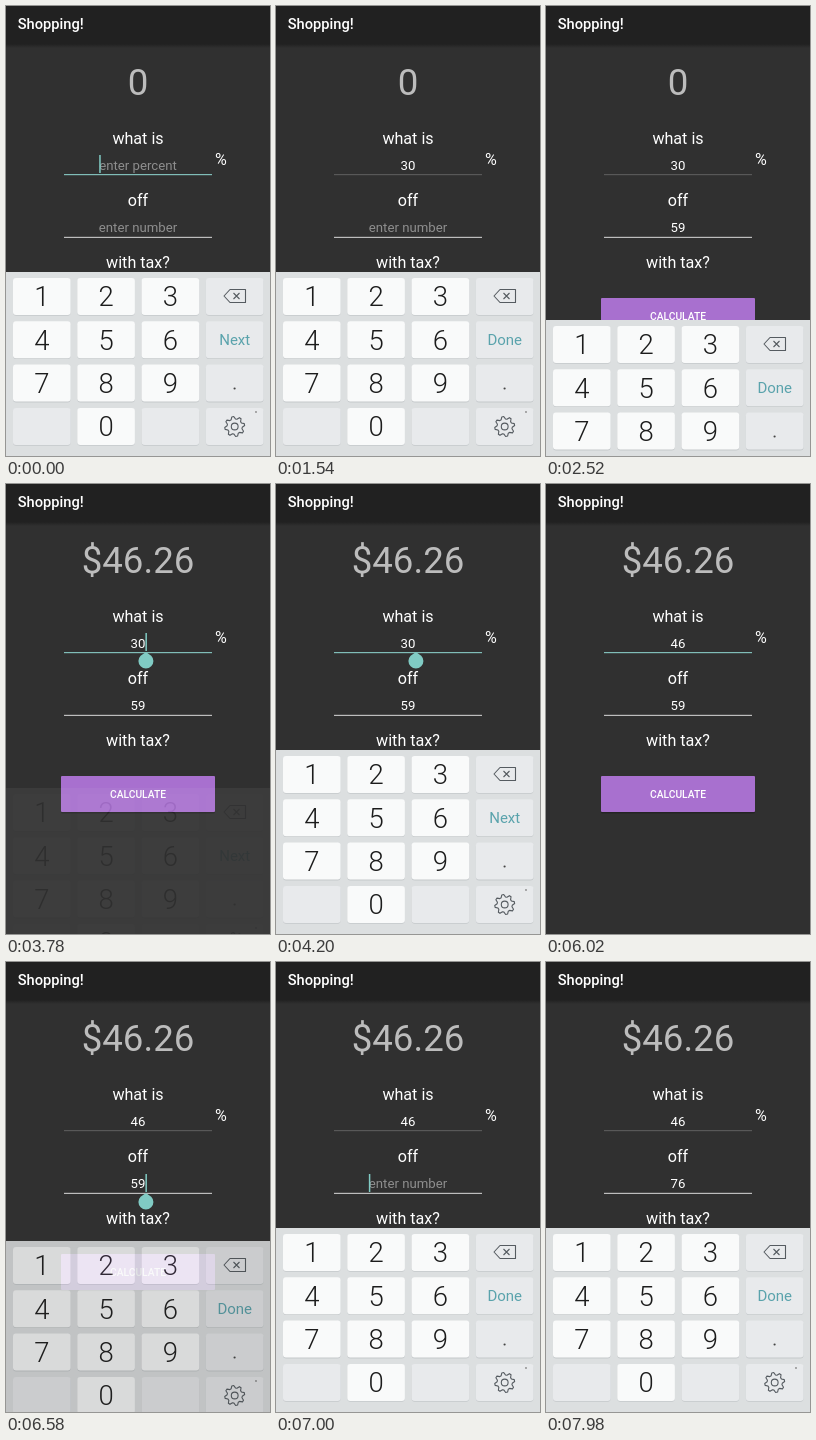
Recreate the animation shown at these times as an HTML page. Size 264x450 px, loop 8 s.

```html
<!DOCTYPE html>
<html>
<head>
<meta charset="utf-8">
<style>
html, body { margin: 0; width: 100%; height: 100%; overflow: hidden; background: #303030; }
svg { display: block; width: 264px; height: 450px; font-family: Roboto, sans-serif; }
.mid { text-anchor: middle; }
.label { font-size: 16.13px; fill: #fff; }
.field { font-size: 13.2px; }
.digit { font-size: 27.5px; font-weight: 300; fill: #1c1c1c; }
.icon { fill: none; stroke: #555b60; stroke-width: 1.1; stroke-linejoin: round; }
</style>
</head>
<body>
<svg viewBox="0 0 264 450">
  <defs>
    <linearGradient id="shade" x2="0" y2="1">
      <stop stop-color="#212121"/><stop offset="1" stop-color="#303030"/>
    </linearGradient>
  </defs>
  <rect width="264" height="450" fill="#303030"/>
  <rect y="38" width="264" height="4" fill="url(#shade)"/>
  <rect width="264" height="38" fill="#212121"/>
  <text x="11.7" y="23" font-size="14.67" font-weight="500" fill="#fff">Shopping!</text>
  <text id="result" class="mid" x="132" y="89" font-size="36.67" fill="#bcbcbc"></text>
  <g class="mid label">
    <text x="132" y="137.5">what is</text>
    <text x="215" y="159">%</text>
    <text x="132" y="200">off</text>
    <text x="132" y="262">with tax?</text>
  </g>
  <text id="pct" class="mid field" x="132" y="163.5"></text>
  <text id="num" class="mid field" x="132" y="226"></text>
  <rect id="line" x="58" y="168" width="148" height="1.2"/>
  <rect x="58" y="230.8" width="148" height="1.2" fill="#bdbdbd"/>
  <rect x="55" y="293" width="154" height="36.5" rx="1" fill="#000" opacity=".25"/>
  <rect x="55" y="292" width="154" height="36" rx="1" fill="#a870cf"/>
  <text class="mid" x="132" y="314" font-size="10.27" font-weight="500" fill="#fff">CALCULATE</text>
  <g id="keys"><rect y="266" width="264" height="184" fill="#dcdfe0"/></g>
  <rect id="cursor" width="1.5" height="18" fill="#80cbc4"/>
  <path id="handle" d="M0 0 L5.3 3.7 A7.5 7.5 0 1 1 -5.3 3.7 Z" fill="#80cbc4"/>
</svg>
<script>
const TICK = 140, LOOP = 8000;
const $ = id => document.getElementById(id);
const keys = $('keys');

function add(tag, attrs, text = '') {
  const el = document.createElementNS('http://www.w3.org/2000/svg', tag);
  for (const k in attrs) el.setAttribute(k, attrs[k]);
  el.textContent = text;
  return keys.appendChild(el);
}

function buildKeys() {
  for (let i = 0; i < 16; i++) {
    const col = i % 4, row = i >> 2;
    const x = 7 + col * 64.3, y = 272 + row * 43.3;
    const digit = row < 3 ? (col < 3 ? row * 3 + col + 1 : '') : col === 1 ? 0 : '';
    const box = { x, width: 57.6, height: 37, rx: 3 };
    add('rect', { ...box, y: y + 0.8, fill: '#c5c9cb' });
    add('rect', { ...box, y, fill: digit === '' ? '#e8eaec' : '#f9fafa' });
    add('text', { class: 'mid digit', x: x + 28.8, y: y + 28.2 }, digit);
  }
  // backspace
  add('path', { class: 'icon', d: 'M218 290 L224 283.5 H239.5 V296.5 H224 Z M227.5 287 l6 6 m0 -6 l-6 6' });
  add('circle', { cx: 228.6, cy: 382.5, r: 1.1, fill: '#444' });
  // gear
  let d = '';
  for (let i = 0; i < 32; i++) {
    const a = (i - 1.5) * Math.PI / 16, r = i % 4 < 2 ? 10 : 7.6;
    d += `${i ? 'L' : 'M'}${228.7 + r * Math.sin(a)} ${420.5 - r * Math.cos(a)}`;
  }
  add('path', { class: 'icon', d: d + 'Z' });
  add('circle', { class: 'icon', cx: 228.7, cy: 420.5, r: 3.4 });
  add('circle', { cx: 250, cy: 406, r: 0.9, fill: '#888' });
}
buildKeys();
const action = add('text', { class: 'mid', x: 228.7, y: 339.3, 'font-size': 15, fill: '#5aa3ac' });

// what changes, and when (ms)
const events = [
  [0, { focus: 'pct', pct: '', num: '', result: '0', handle: false, show: -LOOP, hide: Infinity }],
  [420, { pct: '3' }],
  [700, { pct: '30' }],
  [980, { focus: 'num' }],
  [1820, { num: '5' }],
  [1960, { num: '59' }],
  [2380, { hide: 2380 }],
  [3080, { result: '$46.26' }],
  [3640, { focus: 'pct', handle: true }],
  [3780, { show: 3780, hide: Infinity }],
  [4340, { pct: '3', handle: false }],
  [4480, { pct: '' }],
  [4900, { pct: '4' }],
  [5180, { pct: '46' }],
  [5600, { hide: 5600 }],
  [6300, { focus: 'num', handle: true }],
  [6440, { show: 6440, hide: Infinity }],
  [6860, { num: '5', handle: false }],
  [7000, { num: '' }],
  [7280, { num: '7' }],
  [7420, { num: '76' }]
];

function stateAt(t) {
  const s = { edited: 0 };
  for (const [at, patch] of events) {
    if (at > t) break;
    Object.assign(s, patch);
    if ('pct' in patch || 'num' in patch || 'focus' in patch) s.edited = at;
  }
  return s;
}

function setField(id, value, hint) {
  $(id).textContent = value || hint;
  $(id).setAttribute('fill', value ? '#fff' : '#8e8e8e');
}

function placeKeys(s, t) {
  const step = (t - s.show) / TICK;
  const rise = Math.min(1, 0.05 + step * 0.625);
  const drop = 48 * Math.max(0, (t - s.hide) / TICK) ** 2;
  keys.setAttribute('transform', `translate(0 ${40 * (1 - rise) + drop})`);
  keys.setAttribute('opacity', Math.min(1, rise * 1.25));
  action.textContent = s.focus === 'pct' ? 'Next' : 'Done';
}

function placeCursor(s, t) {
  const half = $(s.focus).getComputedTextLength() / 2;
  const x = 132 + (s[s.focus] ? half : -half);
  const base = s.focus === 'pct' ? 168 : 231;
  const on = (t - s.edited) % 1000 < 500;
  $('cursor').setAttribute('x', x);
  $('cursor').setAttribute('y', base - 19);
  $('cursor').setAttribute('visibility', on ? 'visible' : 'hidden');
  $('handle').setAttribute('transform', `translate(${x + 0.5} ${base})`);
  $('handle').setAttribute('visibility', s.handle ? 'visible' : 'hidden');
}

function draw(now) {
  const t = Math.floor(now % LOOP / TICK) * TICK;
  const s = stateAt(t);
  $('result').textContent = s.result;
  setField('pct', s.pct, 'enter percent');
  setField('num', s.num, 'enter number');
  $('line').setAttribute('fill', s.focus === 'pct' ? '#80bdb8' : '#585858');
  placeKeys(s, t);
  placeCursor(s, t);
}

let start;
function frame(now) {
  start ??= now;
  draw(now - start);
  requestAnimationFrame(frame);
}
draw(0);
requestAnimationFrame(frame);
</script>
</body>
</html>
```
